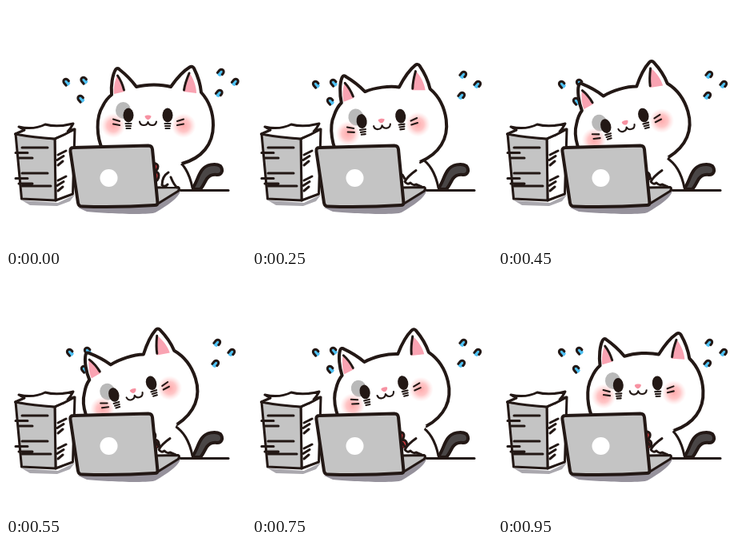
An HTML page for the animation above (1000 ms loop, 300x300 px).

```html
<!DOCTYPE html>
<html lang="en">
<head>
<meta charset="utf-8">
<title>Busy cat</title>
<style>
  html, body { margin: 0; width: 100%; height: 100%; overflow: hidden; background: #fff; }
  svg { display: block; width: 100vw; height: 100vh; }
  .ink { fill: none; stroke: #231815; stroke-width: 4; stroke-linecap: round; stroke-linejoin: round; }
  .mid { stroke-width: 3; }
  .thin { stroke-width: 2.1; }
  .white { fill: #fff; }
  .grey { fill: #c4c4c4; }
  .dark { fill: #4a4646; }
  .red { fill: #d93a40; }
</style>
</head>
<body>
<svg viewBox="0 0 300 300">
  <defs>
    <radialGradient id="blush">
      <stop offset="0" stop-color="#ffa9ab"/>
      <stop offset=".5" stop-color="#ffb8b9" stop-opacity=".8"/>
      <stop offset="1" stop-color="#ffd5d5" stop-opacity="0"/>
    </radialGradient>
    <g id="drop">
      <path d="M-3 4V-1A3 3 0 0 1 3 -1V4Q0 6 -3 4Z" fill="#4fc2f5"/>
      <path class="ink mid" d="M-3 3V-1A3 3 0 0 1 3 -1V1"/>
    </g>
  </defs>

  <g id="sweat"></g>

  <!-- table, tail and body -->
  <path class="ink mid" d="M208 230.500H278"/>
  <path class="ink dark" d="M232 229C238 223 239 213 245 205C250 198 262 196 268 200C272 205 270 211 264 211C258 210 254 212 251 216C248 221 246 226 243 229Z"/>
  <path class="white" d="M150 185H211C222 196 230 207 232 229H150Z"/>
  <path class="ink mid" d="M210 189C222 197 229 208 233 227"/>

  <g id="head">
    <path class="ink white" d="M121 180C113 164 112 139 121 125C124 119 128 114 132 111C131 100 133 86 137 79.500C138.500 77.500 140.500 77.500 142 79.500C149 85 157 93 163 101C176 97.500 194 97.500 206 101C213 91 222 81 229.500 76.500C232 75 234 76 235 78C239 86 243 97 244 108C254 119 259 134 259 149C259 173 245 190 220 197"/>
    <path class="white" d="M121 179L220 196L212 205L150 207Z"/>
    <path d="M139 87C136 93 134 103 135 110L148 107C146 99 143 92 139 87Z M229.500 84C226 91 223 99 222 107L238 109C238 100 234 90 229.500 84Z" fill="#f9a3b2"/>
    <path class="ink mid" d="M139.500 87C143 92 146 99 147.500 105M229 84C226 91 223.500 98 222.500 105"/>
    <path class="ink mid red" d="M179 199C184 194 190 197 190 201C190 204 187 206 187 207C192 208 192 214 189 218C185 221 181 214 179 211Z"/>
    <g id="face">
      <ellipse cx="146.500" cy="130.500" rx="9.500" ry="10.500" fill="#b9b9b9"/>
      <path d="M173.500 137.500C175 136 180 136 181.500 137.500C181.500 140 179 142 177.500 142C176 142 173.500 140 173.500 137.500Z" fill="#f792a2"/>
      <path class="ink thin" d="M167 144.500C168 150.500 176 150.500 177.500 145C179 150.500 187 150.500 188 144.500"/>
    </g>
  </g>

  <!-- paper stack -->
  <path d="M20 243L65 246L86 236L80 244L64 250L30 249Z" fill="#aaa8ae"/>
  <path class="ink mid white" d="M61 166L86 154L83.500 235L62 243Z"/>
  <path class="ink mid grey" d="M12 160L61 166L62 243L19.500 241Z"/>
  <path class="ink mid white" d="M11.500 160L23 155L16 151C29 154 39 153 49 148C60 151 72 150 84 147C82 151 80 154 77 157L85 154C77 159 69 163 61 166C43 165 27 163 11.500 160Z"/>
  <path class="ink mid" id="sheets"/>

  <!-- laptop -->
  <path d="M90 252L188 249L218 231C216 240 202 249 187 258C178 262 120 259 101 257Z" fill="#96929c"/>
  <path class="ink mid grey" d="M186 227L215 226.500Q218 227.500 215 231.500L190 247Z"/>
  <g id="paws">
    <g>
      <path class="white" d="M187 222L203 207L209 211L213 226L195 226Z"/>
      <path class="ink mid" d="M203 208C198 211 195 217 195 224Q199 227 202 223M206 214C208 219 210 224 214 227"/>
    </g>
    <g>
      <path class="white" d="M187 220L204 206L210 210L212 225L194 225Z"/>
      <path class="ink mid" d="M205 205.500C200 209 194 214 191 219.500Q194 224 198 221Q202 225 205 223L212 226M188 211L191 216"/>
    </g>
  </g>
  <path class="ink grey" d="M84 177L178 174.500C181 174.500 182.500 176 183 179L189.500 246C189.500 248 188.500 249 186 249Q140 252 95 250.500C92 250.500 90.500 249 90 246L80.500 182C80 179 81 177 84 177Z"/>
  <circle cx="128.500" cy="215" r="11" fill="#fff"/>
</svg>
<script>
  const STEP = 50, LOOP = 1000, PEAK = 550;
  const SVG = "http://www.w3.org/2000/svg";
  const $ = id => document.getElementById(id);
  const head = $("head"), face = $("face"), paws = $("paws").children;

  function add(parent, html) {
    const g = document.createElementNS(SVG, "g");
    g.innerHTML = html;
    parent.append(g);
  }

  // Both halves of the face: side is -1 or 1, measured from the nose.
  for (const side of [-1, 1]) {
    const eye = 177.5 + 24.5 * side, cheek = 178 + 44 * side;
    const bags = [0, 1, 2].map(i => `M${eye - 3.5 + i / 2} ${147 + i * 3}h${7 - i}`).join("");
    const whiskers = [0, 1].map(i => `M${cheek - 8 * side} ${144 + i * 5}l${8 * side} ${i - 2.5}`).join("");
    add(face, `<circle cx="${cheek}" cy="149.500" r="15.500" fill="url(#blush)"/>
      <ellipse cx="${eye}" cy="136.500" rx="6.500" ry="9" fill="#231815"/>
      <path class="ink thin" d="${bags}${whiskers}"/>`);
  }

  // Edges of loose sheets, in two bundles on each side of the stack.
  let edges = "";
  for (const top of [177, 209]) {
    for (let i = 0; i < 3; i++) {
      const y = top + i * 6.5;
      edges += i ? `M${8 + i * 4} ${y}h${13 + i * 2}` : `M20 ${y}h32`;
      edges += `M${65 - i % 2} ${y + 9}l${10 - i * 2} -5`;
    }
  }
  $("sheets").setAttribute("d", edges + "M20 225h36");

  // Two alternating sets of drops; the first is flung outwards.
  const DROPS = [[80, 98], [102, 96], [98, 119], [264, 86], [282, 98], [262, 112]];
  for (const fling of [1, 0]) {
    add($("sweat"), DROPS.map(([x, y]) => {
      const side = x < 150 ? -1 : 1;
      return `<use href="#drop" transform="translate(${x + 4.5 * side * fling} ${y - 3 * fling}) rotate(${40 * side})"/>`;
    }).join(""));
  }
  const sweat = $("sweat").children;

  // The head slides left ahead of its tilt, then swings back.
  function pose(t) {
    if (t < PEAK) {
      const u = t / PEAK;
      return { tilt: Math.sin(u * Math.PI / 2) ** 2, lean: 1 - (1 - u) ** 2.5 };
    }
    const u = (LOOP - t) / (LOOP - PEAK);
    return { tilt: Math.sin(u * Math.PI / 2), lean: Math.sin(1.2 * u) / Math.sin(1.2) };
  }

  function draw(now) {
    const n = Math.floor((now % LOOP) / STEP);
    const { tilt, lean } = pose(n * STEP);
    head.setAttribute("transform",
      `translate(${-22 * lean} ${3.2 * (tilt + lean)}) rotate(${-17.5 * tilt} 177.5 137)`);
    face.setAttribute("transform", `translate(${2.5 * tilt} ${1.5 * tilt})`);
    for (const pair of [sweat, paws])
      for (let k = 0; k < 2; k++)
        pair[k].style.display = n % 2 === k ? "" : "none";
  }

  const start = performance.now();
  function tick() {
    draw(performance.now() - start);
    requestAnimationFrame(tick);
  }
  tick();
</script>
</body>
</html>
```
